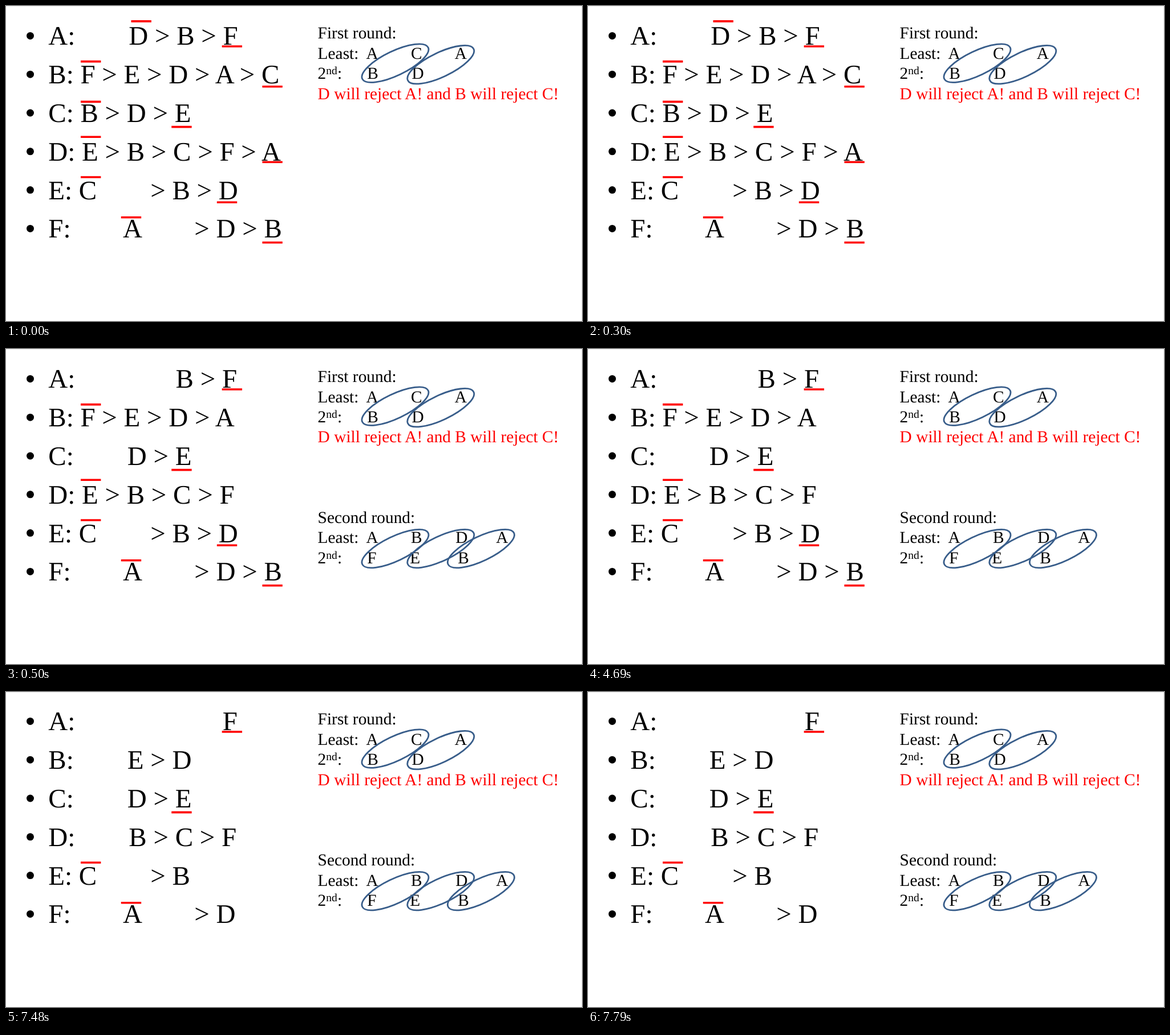
Write an HTML page that moves like this. It is 1010x554 px and loops after 8 s.

```html
<!DOCTYPE html>
<html lang="en">
<head>
<meta charset="utf-8">
<title>Preference lists</title>
<style>
  html, body { margin: 0; width: 100%; height: 100%; overflow: hidden; background: #fff; }
  svg { display: block; }
  text {
    font-family: "Liberation Serif", "Times New Roman", serif;
    font-kerning: none;
    text-rendering: geometricPrecision;
    white-space: pre;
  }
  .list { font-size: 47px; }
  .notes { font-size: 29.4px; }
  .bars { stroke: #f00; stroke-width: 3.6; }
  .rings { fill: none; stroke: #385d8a; stroke-width: 2.8; }
</style>
</head>
<body>
<svg id="stage" width="1010" height="554" viewBox="0 0 1010 554"></svg>
<script>
const LOOP = 8000;
const GRID = 8.845;
const LINE = 35.4;

const scenes = [
  { start: 0, listShift: 0, notesY: 57.3, rounds: 1, rows: [
    "A:        D > B > F",
    "B: F > E > D > A > C",
    "C: B > D > E",
    "D: E > B > C > F > A",
    "E: C        > B > D",
    "F:        A        > D > B"] },
  { start: 500, listShift: 0, notesY: 58.2, rounds: 2, rows: [
    "A:               B > F",
    "B: F > E > D > A",
    "C:        D > E",
    "D: E > B > C > F",
    "E: C        > B > D",
    "F:        A        > D > B"] },
  { start: 7480, listShift: -1, notesY: 57.3, rounds: 2, rows: [
    "A:                      F",
    "B:        E > D",
    "C:        D > E",
    "D:        B > C > F",
    "E: C        > B",
    "F:        A        > D"] }
];

// Grid column, grid row, last scene in which the bar is shown
const bars = [
  [10, 3, 0], [28, 8, 2], [0, 11, 1], [36, 16, 0], [0, 19, 0], [18, 24, 2],
  [0, 26, 1], [36, 31, 0], [0, 34, 2], [27, 39, 1], [8, 42, 2], [36, 47, 1]
];

const rounds = [
  { firstLine: 0,
    lines: ["First round:", "Least:  A        C        A", "2nd:      B        D"],
    rings: [[682.5, 100.6], [762.3, 103.2]] },
  { firstLine: 7,
    lines: ["Second round:", "Least:  A        B        D       A", "2nd:      F        E         B"],
    rings: [[682.5, 351.1], [762.3, 351.1], [832.9, 351.1]] }
];

// Tightens the gap between a space and a capital A, and raises the ordinal
const typeset = s => s
  .replace(/(?<= )A|(?<=A) /g, c => `<tspan dx="-.055em">${c}</tspan>`)
  .replace("2nd:", '2<tspan font-size="19.6" dy="-8">nd</tspan><tspan dy="8">:</tspan>');

const text = (x, y, s, color = "#000") =>
  `<text x="${x}" y="${y}" fill="${color}">${typeset(s)}</text>`;

const note = (top, line, s, color) => text(546.6, top + line * LINE, s, color);

const listRow = (s, i) => {
  const y = 68.4 + 67.8 * i;
  return `<circle cx="42.5" cy="${y - 16}" r="6.5"/>` + text(74.3, y, s);
};

const bar = ([col, row]) =>
  `<path d="M${131 + GRID * col} ${0.3 + GRID * row}h35.4"/>`;

const ring = ([x, y]) =>
  `<ellipse rx="64" ry="21.4" transform="translate(${x} ${y}) rotate(-25.6)"/>`;

const drawScene = ({ listShift, notesY, rounds: count, rows }, index) => {
  const shown = rounds.slice(0, count);
  const notes = shown.flatMap(r => r.lines.map((s, i) => note(notesY, r.firstLine + i, s)));
  return `
    <path d="M0 .5H1009.5V554" fill="none" stroke="#f0f0f0"/>
    <g class="notes">
      ${notes.join("")}
      ${note(notesY, 3, "D will reject A! and B will reject C!", "#f00")}
    </g>
    <g transform="translate(0 ${listShift})">
      <g class="list">${rows.map(listRow).join("")}</g>
      <g class="bars">${bars.filter(b => b[2] >= index).map(bar).join("")}</g>
      <g class="rings">${shown.flatMap(r => r.rings).map(ring).join("")}</g>
    </g>`;
};

const stage = document.getElementById("stage");
const pictures = scenes.map(drawScene);
const origin = performance.now();
let current = -1;

function update() {
  const t = (performance.now() - origin) % LOOP;
  const index = scenes.filter(s => s.start <= t).length - 1;
  if (index !== current) {
    current = index;
    stage.innerHTML = pictures[index];
  }
  requestAnimationFrame(update);
}
update();
</script>
</body>
</html>
```
